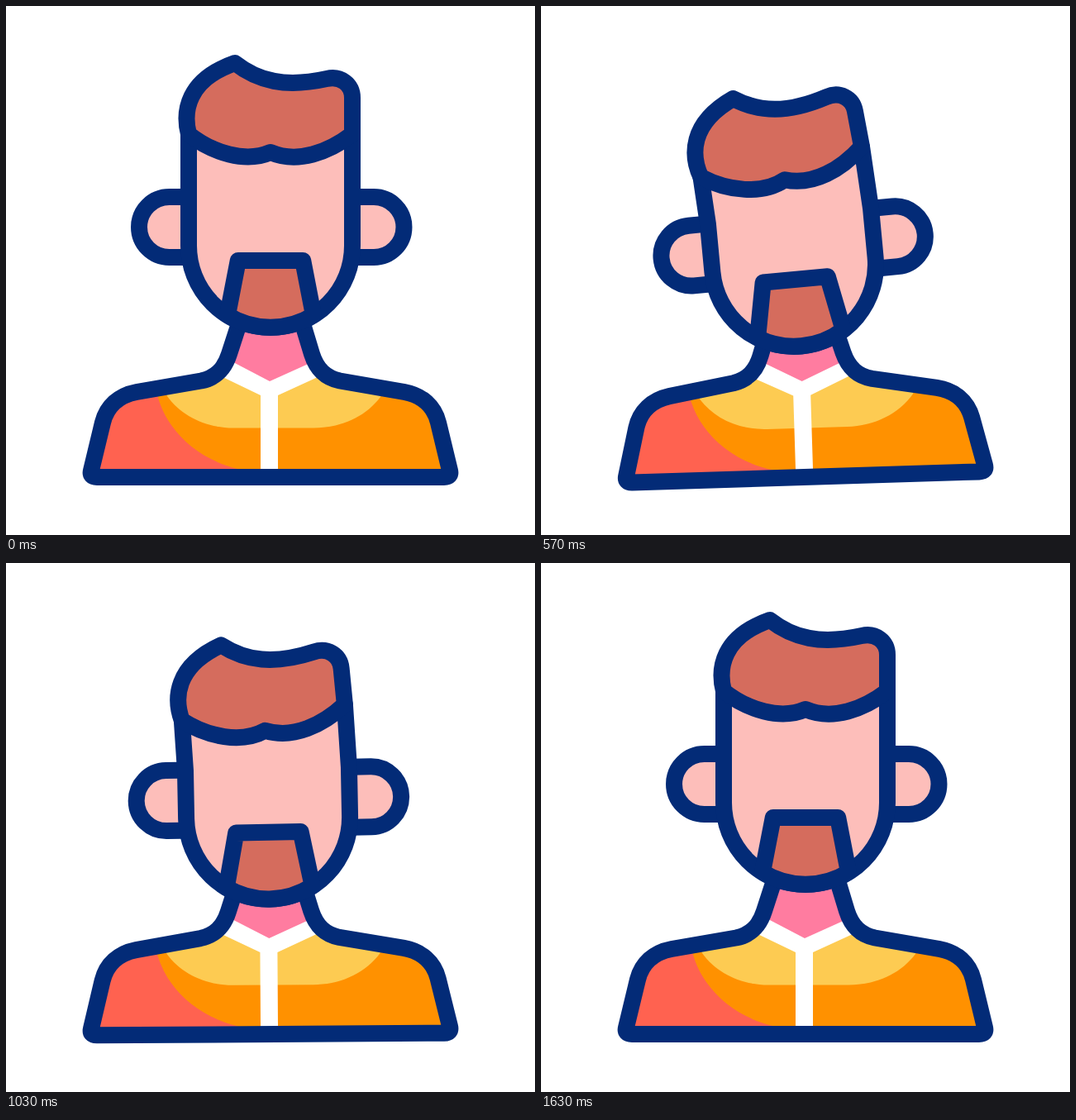
Animation, 640 px wide and 640 px high, one loop 2 s. Source, as an HTML page:

```html
<!DOCTYPE html>
<html lang="en">
<head>
<meta charset="utf-8">
<title>Swaying man</title>
<style>
  html, body { margin: 0; width: 100%; height: 100%; overflow: hidden; background: #fff; }
  svg { display: block; width: 100%; height: 100%; }
  .line { fill: none; stroke: #032b77; stroke-width: 20; stroke-linejoin: round; }
  .skin { fill: #fdbeba; }
  .hair { fill: #d56c5d; }
</style>
</head>
<body>
<svg viewBox="0 0 640 640">
  <defs>
    <path id="torso" d="M284 378L270 421C264 440 253 450 236 453.5L158 467C137 471 122 484 117 504L103 562Q101 570 110 570H530Q539 570 537 562L523 504C518 484 503 471 482 467L404 453.5C387 450 376 440 370 421L357 378Z"/>
    <clipPath id="inside"><use href="#torso"/></clipPath>
  </defs>
  <g id="body">
    <g clip-path="url(#inside)">
      <rect x="90" y="370" width="460" height="210" fill="#ff9100"/>
      <path fill="#ff6250" d="M182 460Q182 468 184 474C196 515 232 548 280 560V580H90V460Z"/>
      <path fill="#fdcb52" d="M188 460L195 472C212 496 242 510.500 275 510.500H372C405 510.500 435 497 453 473L460 440L400 410H240Z"/>
      <path fill="#fff" d="M319 380H225V431L308 471V575H329V471L412 433V380Z"/>
      <path fill="#ff7ca0" d="M319 454L250 418V370H390V422Z"/>
    </g>
    <use href="#torso" class="line"/>
    <g id="head">
      <path class="line skin" style="fill:#fdbeba" d="M230 231H197.500a36.500 36.500 0 0 0 0 73H230M410 231H445a36.500 36.500 0 0 1 0 73H410"/>
      <path id="face" class="line" style="fill:#fdbeba"/>
      <path class="hair" d="M268 374L280.800 308H359.200L372 374A99 99 0 0 1 268 374Z"/>
      <path class="line" d="M268 374L280.800 308H359.200L372 374A99 99 0 0 1 268 374Z"/>
      <path id="hair" class="line" style="fill:#d56c5d" d="M221 155C214 128 219 89 277 69C305 91 338 99 388 88C405 84 419 95 419 111V155C390 177 353 191 320 177C290 190 250 178 221 155Z"/>
    </g>
  </g>
</svg>
<script>
const LOOP = 2000;
const KEYS = [0, 417, 813, 1233, 1633];
const TILT = [0, -5, 5, -5, 0];
const DROP = [0, 33, 0, 33, 0];
const HAIR_TURN = [0, -7.2, -1.3, -7.2, 0];
const HAIR_DROP = [0, 13.5, 1.5, 13.5, 0];
const HAIR_SHIFT = [0, -2.2, -2, -2.2, 0];
const HAIR_PIVOT = { x: 320, y: 170 };

const [body, head, face, hair] = ["body", "head", "face", "hair"].map(id => document.getElementById(id));
const smooth = x => x * x * (3 - 2 * x);
const set = (el, value) => el.setAttribute("transform", value);

function track(values, t) {
  if (t >= KEYS[4]) return values[4];
  const i = KEYS.findIndex(k => k > t) - 1;
  const p = smooth((t - KEYS[i]) / (KEYS[i + 1] - KEYS[i]));
  return values[i] + (values[i + 1] - values[i]) * p;
}

// Thirty poses per second, switching on 10 ms ticks.
const snap = t => Math.floor((Math.floor(t / 10) + 0.5) * 0.3) * 1000 / 30;

function draw(time) {
  const t = snap(time % LOOP);
  const tilt = track(TILT, t);
  const turn = track(HAIR_TURN, t);
  const dx = track(HAIR_SHIFT, t);
  const dy = track(HAIR_DROP, t);
  const { x: px, y: py } = HAIR_PIVOT;
  const cos = Math.cos(turn * Math.PI / 180);
  const sin = Math.sin(turn * Math.PI / 180);
  const onHair = (x, y) =>
    `${px + dx + (x - px) * cos - (y - py) * sin} ${py + dy + (x - px) * sin + (y - py) * cos}`;

  set(body, `rotate(${tilt} 320 560)`);
  set(head, `translate(0 ${track(DROP, t)}) rotate(${2 * tilt} 320 390)`);
  set(hair, `translate(${dx} ${dy}) rotate(${turn} ${px} ${py})`);
  // The temples follow the hair, the jaw stays with the head.
  face.setAttribute("d",
    `M${onHair(221, 155)}L221 231V290A99 99 0 0 0 419 290V231L${onHair(419, 155)}Z`);
}

const start = performance.now();
function tick() {
  draw(performance.now() - start);
  requestAnimationFrame(tick);
}
tick();
</script>
</body>
</html>
```
